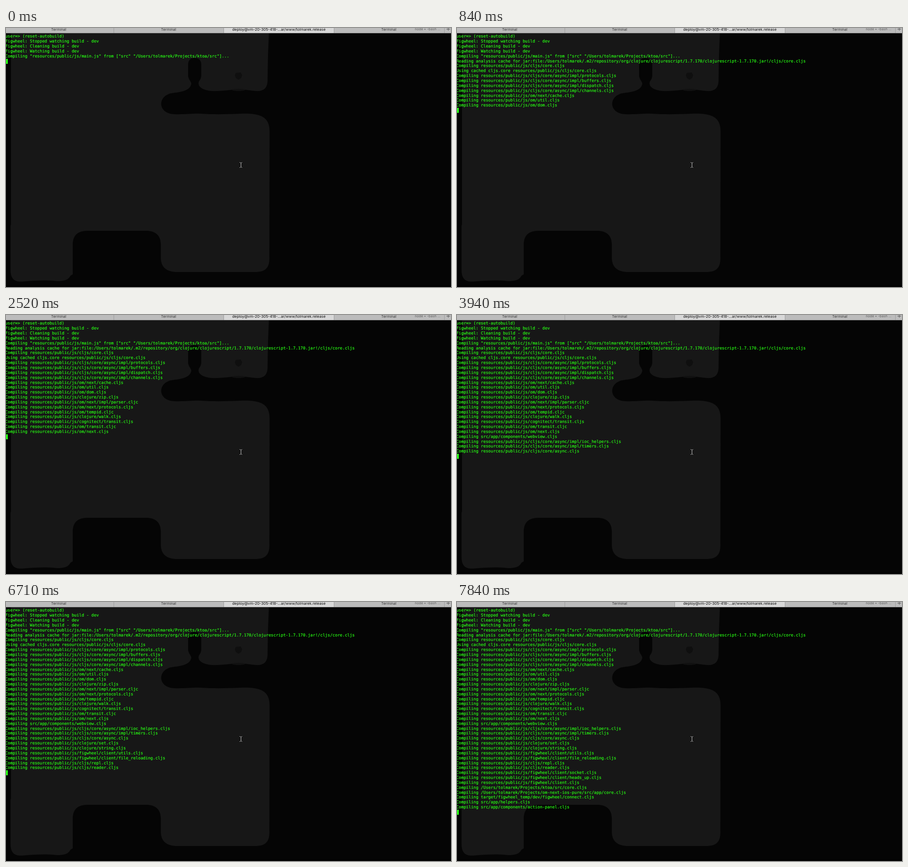
An HTML page with a canvas for the animation above (8000 ms loop, 980x571 px).

```html
<!DOCTYPE html>
<html lang="en">
<head>
<meta charset="utf-8">
<title>Terminal build</title>
<style>
  html, body { margin: 0; width: 100%; height: 100%; overflow: hidden; background: #050505; }
  #stage { position: relative; width: 980px; height: 571px; overflow: hidden; text-rendering: geometricPrecision; }
  canvas { position: absolute; left: 0; top: 0; }
  #log {
    position: absolute; left: -1.6px; top: 14.4px; margin: 0;
    font: 9px/10.84px "DejaVu Sans Mono", monospace; color: #28fe14; white-space: pre;
    -webkit-text-stroke: .2px #28fe14;
  }
  #caret { position: absolute; left: 0; width: 4px; height: 11px; background: #28fe14; }
  .tab {
    position: absolute; top: -2px; transform: translateX(-50%);
    font: 8.25px/10px Inter, sans-serif; color: #3c3c3c; white-space: pre;
  }
  .on { color: #111; }
  .dim { color: #666; font-size: 7.6px; }
</style>
</head>
<body>
<div id="stage">
  <canvas id="art" width="980" height="571"></canvas>
  <span class="tab" style="left:116px">Terminal</span>
  <span class="tab" style="left:358px">Terminal</span>
  <span class="tab on" style="left:601px">deploy@vm-20-305-418-...ar/www/tolmarek.release</span>
  <span class="tab" style="left:843px">Terminal</span>
  <span class="tab dim" style="left:928.5px">node • -bash ...</span>
  <pre id="log"></pre>
  <div id="caret"></div>
</div>
<script>
const LOOP = 8000, TOP = 13.4, PITCH = 10.84;

const compiling = (dir, names) => names.split(' ').map(n => 'Compiling ' + dir + n);
const JS = 'resources/public/js/';
const lines = [
  'user=> (reset-autobuild)',
  'Figwheel: Stopped watching build - dev',
  'Figwheel: Cleaning build - dev',
  'Figwheel: Watching build - dev',
  'Compiling "resources/public/js/main.js" from ["src" "/Users/tolmarek/Projects/ktoa/src"]...',
  'Reading analysis cache for jar:file:/Users/tolmarek/.m2/repository/org/clojure/clojurescript/1.7.170/clojurescript-1.7.170.jar!/cljs/core.cljs',
  ...compiling(JS, 'cljs/core.cljs'),
  'Using cached cljs.core resources/public/js/cljs/core.cljs',
  ...compiling(JS + 'cljs/core/async/impl/', 'protocols.cljs buffers.cljs dispatch.cljs channels.cljs'),
  ...compiling(JS, 'om/next/cache.cljs om/util.cljs om/dom.cljs clojure/zip.cljs om/next/impl/parser.cljc ' +
    'om/next/protocols.cljs om/tempid.cljc clojure/walk.cljs cognitect/transit.cljs om/transit.cljc om/next.cljs'),
  ...compiling('src/app/components/', 'webview.cljs'),
  ...compiling(JS + 'cljs/core/', 'async/impl/ioc_helpers.cljs async/impl/timers.cljs async.cljs'),
  ...compiling(JS, 'clojure/set.cljs clojure/string.cljs figwheel/client/utils.cljs ' +
    'figwheel/client/file_reloading.cljs cljs/repl.cljs cljs/reader.cljs ' +
    'figwheel/client/socket.cljs figwheel/client/heads_up.cljs figwheel/client.cljs'),
  ...compiling('/Users/tolmarek/Projects/', 'ktoa/src/core.cljs om-next-ios-pure/src/app/core.cljs'),
  ...compiling('target/figwheel_temp/dev/figwheel/', 'connect.cljs'),
  ...compiling('src/app/', 'helpers.cljs components/action-panel.cljs')
];

// [time in ms, lines printed]
const prints = [
  [0, 5], [150, 6], [420, 10], [630, 12], [840, 15], [1770, 17], [2160, 21],
  [2520, 23], [3590, 24], [3760, 26], [3940, 27], [5820, 29], [6000, 31],
  [6530, 32], [6710, 33], [7070, 35], [7250, 36], [7840, 41]
];
const caretOff = [[1590, 1770], [4690, 5050], [5650, 5820]];

function drawBackdrop(g) {
  const rect = (color, x, y, w, h) => { g.fillStyle = color; g.fillRect(x, y, w, h); };
  rect('#050505', 0, 0, 980, 571);

  g.fillStyle = '#171717';
  g.fill(new Path2D(`M11 10 H579 L577 60 L576 115 C576 132 568 139 553 139
    C530 137 520 135 508 135 C490 137 475 139 455 139 C438 138 424 132 424 122
    C424 116 430 114 430 104 V80 C430 61 401 61 401 80 V104
    C401 114 408 117 408 123 C406 137 388 141 370 143
    C333 146 332 188 370 190 C395 191 410 188 430 189 C460 191 490 190 515 189
    C555 188 580.5 192 580.5 228 L580 508 C580 530 570 538 548 538 H378
    C354 538 341 528 341 506 V478 C341 456 328 447 308 447 H180
    C157 447 147 458 147 478 V543 L142 546 C137 556 128 558 112 558
    C85 555 60 557 36 559 C17 560 10 552 10 532 V436 L11 433 Z`));

  g.fillStyle = '#0f0f0f';
  g.fill(new Path2D('M506 99 L517 98 L520 104 L518 110 L512 114 L506 110 L504 104 Z'));
  g.fillStyle = '#111';
  g.beginPath();
  g.ellipse(512, 136.5, 14, 2.5, 0, 0, 7);
  g.fill();
  rect('#020202', 0, 567, 980, 4);

  // tab strip
  rect('#bcbcbc', 0, 0, 980, 11);
  rect('#d8d8d8', 480, 0, 242, 11);
  for (const x of [237, 479, 722, 965]) rect('#9c9c9c', x, 0, 1, 11);
  rect('#505050', 0, 11, 980, 1);
  rect('#555', 970, 2, 8, 1);
  rect('#555', 973.5, 0, 1, 6);

  // mouse pointer
  g.strokeStyle = '#c8c8c8';
  g.lineWidth = 1;
  g.stroke(new Path2D('M514.5 296.5 H516 L517.5 298 L519 296.5 H520 M517.5 298 V306 M514.5 307.5 H516 L517.5 306 L519 307.5 H520'));
}

const log = document.getElementById('log');
const caret = document.getElementById('caret');
let shown = -1;

function render(now) {
  const t = now % LOOP;
  const count = prints.findLast(p => p[0] <= t)[1];
  if (count !== shown) {
    shown = count;
    log.textContent = lines.slice(0, count).join('\n');
    caret.style.top = Math.round(TOP + count * PITCH) + 'px';
  }
  const hidden = caretOff.some(([from, to]) => t >= from && t < to);
  caret.style.visibility = hidden ? 'hidden' : 'visible';
}

drawBackdrop(document.getElementById('art').getContext('2d'));
const start = performance.now();
function tick() {
  render(performance.now() - start);
  requestAnimationFrame(tick);
}
tick();
</script>
</body>
</html>
```
